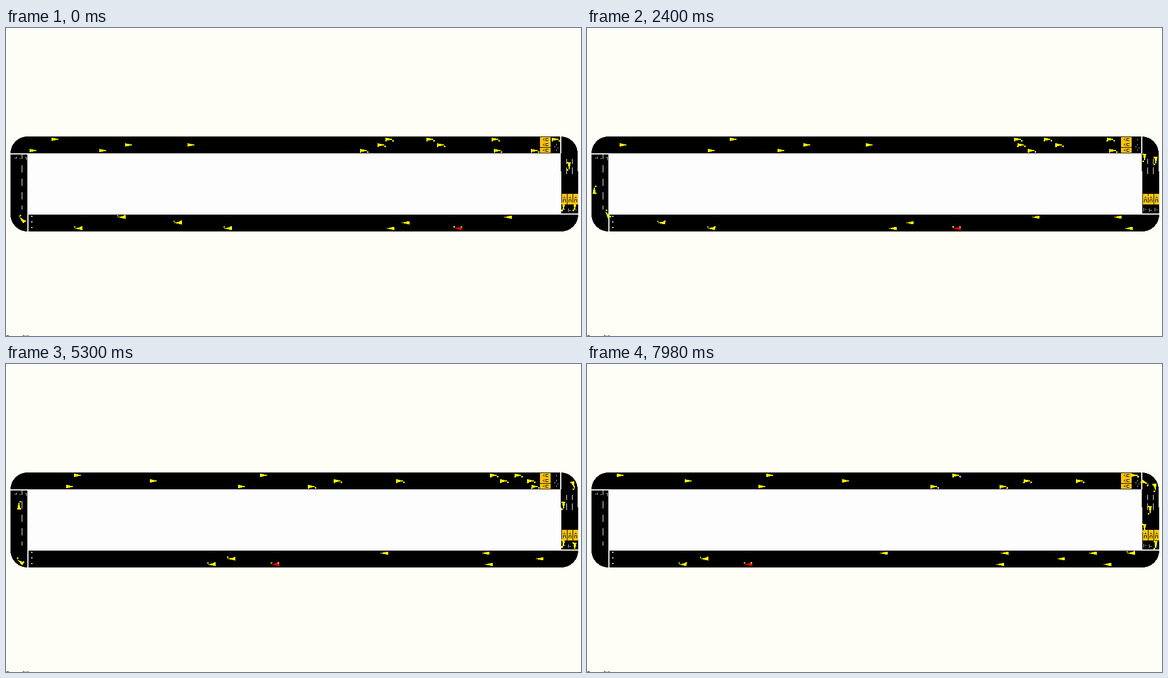
Write an HTML page that moves like this. It is 1023 by 548 pixels and loops after 8 s.

```html
<!DOCTYPE html>
<html lang="en">
<head>
<meta charset="utf-8">
<title>Ring road traffic</title>
<style>
html, body { margin: 0; width: 100%; height: 100%; overflow: hidden; background: #fefef7; }
svg { display: block; }
</style>
</head>
<body>
<svg width="1023" height="548" viewBox="0 0 1023 548" shape-rendering="crispEdges">
  <rect width="1023" height="548" fill="#fefef7"/>
  <path d="M38 193H987A30 30 0 0 1 1017 223V255H1018V332A30 30 0 0 1 988 362H38A30 30 0 0 1 8 332V223A30 30 0 0 1 38 193Z"/>
  <path d="M38 223H987V255H988V332H38Z" fill="#fdfdfd"/>
  <g fill="none" stroke="#fff">
    <path stroke-width="2" d="M8 224H38M987 193V223M988 331H1018M39 332V362"/>
    <path d="M28.5 244V323" stroke-dasharray="13 11"/>
    <path d="M28.5 225V233M997.5 233V242M997.5 248V260M1007.5 233V242M1007.5 248V260"/>
    <path stroke="#ccc" d="M15 231.5H17M18.5 229V233M24 232.5H26M34 230.5H37M36.5 230V235"/>
    <path stroke="#ccc" d="M990.5 320V326M993 322.5H995M1000.5 321V327M1002 324.5H1005M1010.5 320V326M1013 323.5H1015"/>
    <path stroke="#aaa" d="M979.5 197V200M979.5 206V209M979.5 216V219M975 211.5H978M981 213.5H983"/>
    <path stroke-width="2" stroke-dasharray="2 8" d="M46 334V356"/>
  </g>
  <g id="cars"></g>
  <g id="stops"></g>
  <path stroke="#000" d="M1 547.5H5M30 547.5H33M35 547.5H36M38 547.5H40"/>
</svg>
<script>
const NS = 'http://www.w3.org/2000/svg';
const CRUISE = 24.75;   // top speed, px per step
const ACCEL = 0.3;      // px per step squared
const BRAKE_FROM = 660; // free cars slow down from here towards the corner

function add(parent, tag, attrs) {
  const el = document.createElementNS(NS, tag);
  for (const key in attrs) el.setAttribute(key, attrs[key]);
  parent.appendChild(el);
  return el;
}

// Yellow stop boxes across each set of three lanes
const stops = document.getElementById('stops');
function stopBox(transform) {
  const g = add(stops, 'g', { transform });
  add(g, 'rect', { width: 19, height: 9, fill: '#fac411' });
  add(g, 'path', { d: 'M15 2.5H10.5V6.5H15M5 4.5H8M7.5 2V3M7.5 6V7', fill: 'none', stroke: '#000' });
}
for (let i = 0; i < 3; i++) {
  stopBox(`translate(950 ${193.5 + i * 9.7})`);
  stopBox(`translate(${997.5 + i * 10} 295) rotate(90)`);
}

// Concentric lanes, clockwise from the start of the top road
const [outer, middle, inner] = [25, 15, 5].map(r => {
  const arc = (x, y) => `A${r} ${r} 0 0 1 ${x} ${y}`;
  const path = document.createElementNS(NS, 'path');
  path.setAttribute('d', `M36.5 ${223 - r}H987${arc(987 + r, 223)}V331.6${arc(987, 331.6 + r)}` +
    `H38${arc(38 - r, 331.6)}V223${arc(38, 223 - r)}H36.5`);
  return { path, length: path.getTotalLength() };
});

const layer = document.getElementById('cars');
const cars = [];
function addCar(lane, from, { speed = CRUISE, accel = ACCEL, color = '#ff0' } = {}) {
  const g = add(layer, 'g', {});
  add(g, 'path', { d: 'M-7 -3L7 0L-7 3Z', fill: color });
  const blinker = add(g, 'g', { fill: '#ff0' });
  for (const cx of [-6, 6.5]) add(blinker, 'circle', { cx, cy: 2.7, r: 1.5 });
  cars.push({ lane, from, speed, accel, g, blinker, hazard: color !== '#ff0' });
}

// Free-flowing cars
for (const from of [51.5, 1730, 1996]) addCar(outer, from);
for (const from of [182.5, 293.5, 1787.6, 2068]) addCar(middle, from);
for (const from of [12.5, 136.5, 1856.2]) addCar(inner, from);

// Cars slowing down for the first corner
addCar(outer, 645.5, { speed: 11.9, accel: 0.07 });
addCar(middle, 631.5, { speed: 15.3, accel: -0.1 });
addCar(inner, 600.5, { speed: 23.6, accel: -0.44 });

// Cars pulling away around the right-hand end
addCar(outer, 718.5, { speed: 8.2 });
addCar(outer, 834.5, { speed: 7.6 });
addCar(outer, 941.5, { speed: 7.75 });
addCar(outer, 1085, { speed: 9.8 });
addCar(middle, 737.5, { speed: 8.44 });
addCar(middle, 997, { speed: 7.55 });
addCar(inner, 838.5, { speed: 7.67 });
addCar(inner, 904.5, { speed: 7.75 });
addCar(inner, 1053.4, { speed: 8.1 });

// Cars gaining speed along the bottom road
addCar(inner, 1169.2, { speed: 12.4 });
addCar(middle, 1382.6, { speed: 18.4 });
addCar(outer, 1441, { speed: 18.95 });
addCar(outer, 1320.5, { speed: 20.2, accel: 0.2, color: '#f00' });

function distance({ from, speed, accel }, step) {
  if (speed === CRUISE) {
    const d = from + CRUISE * step;
    const braking = from < BRAKE_FROM ? Math.max(0, (d - BRAKE_FROM) / CRUISE) : 0;
    return d - 0.33 * braking ** 2;
  }
  // Accelerate until the top speed is reached, then hold it
  const t = accel > 0 ? Math.min(step, (CRUISE - speed) / accel) : step;
  return from + speed * t + accel * t * t / 2 + CRUISE * (step - t);
}

function pointOn(lane, d) {
  return lane.path.getPointAtLength((d + lane.length) % lane.length);
}

function place(car, step) {
  const { lane, g, blinker, hazard } = car;
  const d = distance(car, step) % lane.length;
  const rear = pointOn(lane, d - 7), front = pointOn(lane, d + 7);
  const angle = Math.atan2(front.y - rear.y, front.x - rear.x) * 180 / Math.PI;
  const x = (front.x + rear.x) / 2, y = (front.y + rear.y) / 2;
  g.setAttribute('transform', `translate(${x.toFixed(2)} ${y.toFixed(2)}) rotate(${angle.toFixed(2)})`);
  const turning = hazard || (d > 507 && d < 1100) || d > 1620;
  blinker.setAttribute('visibility', turning ? 'visible' : 'hidden');
}

// Pictures last 20, 20 and 100 ms; the traffic advances every 7.5 pictures
function stepAt(ms) {
  const u = ms + 20;
  const picture = 3 * Math.floor(u / 140) + Math.min(2, Math.floor(u % 140 / 20)) - 1;
  return Math.floor((picture + 3) / 7.5);
}

const start = performance.now();
let shown = -1;
function render() {
  const step = stepAt((performance.now() - start) % 8000);
  if (step !== shown) {
    cars.forEach(car => place(car, step));
    shown = step;
  }
  requestAnimationFrame(render);
}
render();
</script>
</body>
</html>
```
